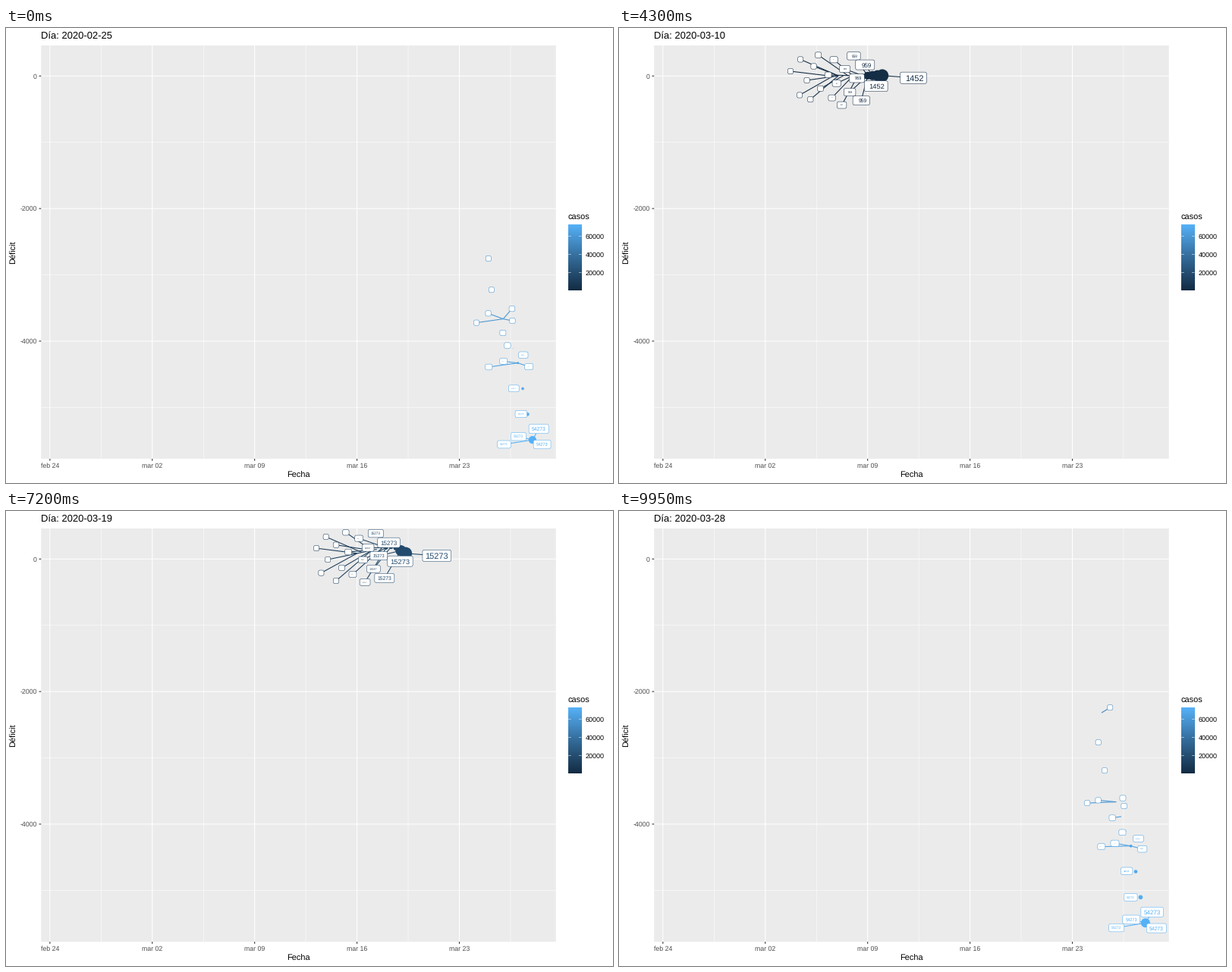
Recreate the animation shown at these times as a matplotlib script. Size 800 by 600 pixels, loop 10000 ms.

```python
import numpy as np
import matplotlib.pyplot as plt
from matplotlib.animation import FuncAnimation
from matplotlib.colors import LinearSegmentedColormap
from matplotlib.patches import Circle, FancyBboxPatch, Rectangle

plt.rcParams.update({"font.family": "Liberation Sans", "path.snap": False,
                     "text.hinting": "no_hinting"})

WIDTH, HEIGHT, FRAMES, INTERVAL = 800, 600, 200, 50
LEFT, RIGHT, TOP, BOTTOM = 46.3, 724.7, 23, 568
PX = 0.72  # points per pixel at 100 dpi
WAKE = 20
FIRST_DAY, FIRST_FRAME, LAST_FRAME = 9, 50, 197
STEEP_DAY = 26.5
PAD = 3.6
GOLDEN = 0.618034

# Active cases per day, 4 to 28 March; the total grows a little faster
ACTIVE = np.array([198, 254, 357, 490, 629, 959, 1452, 1954, 2692, 3900, 5100,
                   6948, 8352, 9659, 12037, 15273, 17393, 21475, 24277, 27552,
                   33183, 38809, 45084, 49844, 54273])
SHARE = ACTIVE * (1.05 + 5.2e-6 * ACTIVE) / 72248
DEFICIT = {9: 0, 18: 10, 20: 40, 22: 130, 23.5: 190, 25: 0, 27: -400,
           28: -765, 29: -1510, 30: -2320, 31: -3665, 32: -4330, 33: -5490}

# Label offsets: the two newest, and the four held steps of a day
NEWEST = [(41, 3), (-3, 14)]
HELD = [(-38, 8), (-19, -7), (14, 8), (9, -17)]

blues = LinearSegmentedColormap.from_list(
    "blues", ["#132B43", "#336B99", "#56B1F7"])


def x_px(day):
    return LEFT + (day + 0.6) * (RIGHT - LEFT) / 35.2


def y_px(value):
    return 63.3 - 0.0874 * value


class Item:
    """One day value or in-between step, as seen at a given age."""

    def __init__(self, frame, age):
        step, self.phase = divmod(frame - FIRST_FRAME, 6)
        t = step + max(0, self.phase - 3) / 3
        self.day = FIRST_DAY + t
        self.age = age
        self.x = x_px(self.day)
        self.y = y_px(np.interp(self.day, list(DEFICIT),
                                list(DEFICIT.values())))
        self.color = blues(np.interp(t, np.arange(len(SHARE)), SHARE))
        self.scale = (1 - age / WAKE) ** 3
        self.text = str(ACTIVE[min(round(t), len(ACTIVE) - 1)])
        self.font = 11 * self.scale
        digits = len(self.text)
        self.w = 2 * PAD + self.font * (0.556 * digits + 0.278 * (5 - digits))
        self.h = 2 * PAD + 0.72 * self.font


def label_start(item, head):
    """Fan out behind a flat curve, stay beside the points of a steep one."""
    if item.age < 2:
        return np.add((item.x, item.y), NEWEST[item.age])
    if head.day < STEEP_DAY:
        rise = -32 + 75 * (item.age * GOLDEN % 1)
        return np.array([head.x - 12 - 5.2 * item.age, head.y + rise])
    if item.phase > 3:
        side = (2, 10) if item.age < 5 else (-item.w / 2 - 4, 0)
    else:
        dx, dy = HELD[item.phase]
        side = dx, dy * (0.5 + 0.5 * item.scale)
    return np.add((item.x, item.y), side)


def separate(pos, size):
    """Push overlapping boxes apart and keep them inside the panel."""
    reach = (size[:, None] + size[None]) / 2
    low = np.array([LEFT, TOP]) + size / 2 + 1
    high = np.array([RIGHT, BOTTOM]) - size / 2 - 1
    for _ in range(60):
        delta = pos[:, None] - pos[None]
        overlap = reach - np.abs(delta)
        hit = (overlap > 0).all(axis=2)
        np.fill_diagonal(hit, False)
        if not hit.any():
            break
        axis = overlap.argmin(axis=2)[..., None] == np.arange(2)
        push = np.where(delta >= 0, 1, -1) * overlap * axis * hit[..., None]
        pos = np.clip(pos + 0.3 * push.sum(axis=1), low, high)
    return np.clip(pos, low, high)


def place_labels(frame, items):
    rng = np.random.default_rng(frame)
    pos = np.array([label_start(item, items[-1]) for item in items])
    spread = np.array([[0.15 * item.age] for item in items])
    pos = pos + spread * rng.normal(size=pos.shape)
    return separate(pos, np.array([(item.w, item.h) for item in items]))


fig = plt.figure(figsize=(WIDTH / 100, HEIGHT / 100), dpi=100,
                 facecolor="white")
ax = fig.add_axes([0, 0, 1, 1])


def label(x, y, text, size, color="black", **kw):
    return ax.text(x, y, text, fontsize=size * PX, color=color, **kw)


def line(xs, ys, color, width, z):
    return ax.plot(xs, ys, color=color, lw=width * PX, zorder=z,
                   solid_capstyle="butt")[0]


def draw_static():
    ax.add_patch(Rectangle((LEFT, TOP), RIGHT - LEFT, BOTTOM - TOP,
                           fc="#EBEBEB", lw=0, zorder=0))
    weeks = ["feb 24", "mar 02", "mar 09", "mar 16", "mar 23"]
    for i, name in enumerate(weeks):
        x = x_px(7 * i)
        line([x, x], [TOP, BOTTOM], "white", 1.07, 1)
        line([x_px(7 * i + 3.5)] * 2, [TOP, BOTTOM], "white", 0.53, 1)
        line([x, x], [BOTTOM, BOTTOM + 2.75], "#333333", 1.07, 1)
        label(x, 580, name, 8.8, "#4D4D4D", ha="center")
    for value in (0, -2000, -4000):
        y = y_px(value)
        line([LEFT, RIGHT], [y, y], "white", 1.07, 1)
        line([LEFT, RIGHT], [y_px(value - 1000)] * 2, "white", 0.53, 1)
        line([LEFT - 2.75, LEFT], [y, y], "#333333", 1.07, 1)
        label(41, y + 3.2, str(value), 8.8, "#4D4D4D", ha="right")
    label(385.5, 593, "Fecha", 11, ha="center")
    label(9.5, 295.5, "Déficit", 11, rotation=90, ha="center", va="center")

    label(741, 253, "casos", 11)
    ramp = np.linspace(1, 0, 256)[:, None]
    ax.imshow(ramp, cmap=blues, extent=(741.2, 758.5, 346.5, 260.1),
              aspect="auto", zorder=1)
    for value in (20000, 40000, 60000):
        y = 346.5 - value * 0.0012
        for x in (741.2, 755):
            line([x, x + 3.5], [y, y], "white", 0.53, 2)
        label(764, y + 3.2, str(value), 9)
    ax.set_xlim(0, WIDTH)
    ax.set_ylim(HEIGHT, 0)
    ax.axis("off")


draw_static()
title = label(46, 14, "", 13)
moving = []


def draw_item(item, cx, cy, z):
    diameter = 16.6 * item.scale
    if diameter > 0.6:
        moving.append(ax.add_patch(Circle((item.x, item.y), diameter / 2,
                                          fc=item.color, lw=0, zorder=3)))
    gap = np.hypot(max(0, abs(cx - item.x) - item.w / 2),
                   max(0, abs(cy - item.y) - item.h / 2))
    if gap > 7.2:
        moving.append(line([item.x, cx], [item.y, cy], item.color, 1.07, 4))
    moving.append(ax.add_patch(FancyBboxPatch(
        (cx - item.w / 2, cy - item.h / 2), item.w, item.h,
        boxstyle="round,pad=0,rounding_size=2.16", fc="white",
        ec=item.color, lw=0.53 * PX, zorder=z)))
    if item.font > 1:
        moving.append(label(cx + item.w / 2 - PAD, cy + 0.36 * item.font,
                            item.text, item.font, item.color,
                            ha="right", zorder=z))


def update(frame):
    while moving:
        moving.pop().remove()
    day = 1 + (frame + 2) // 7 if frame < 26 else 5 + (frame - 26) // 6
    title.set_text(f"Día: {np.datetime64('2020-02-24') + day}")

    # The wake of the last days runs on into the start of the loop
    now = frame + FRAMES if frame < WAKE else frame
    items = [Item(now - age, age) for age in range(WAKE, -1, -1)
             if FIRST_FRAME <= now - age <= LAST_FRAME]
    if items:
        places = place_labels(now, items)
        for i, (item, (cx, cy)) in enumerate(zip(items, places)):
            draw_item(item, cx, cy, 5 + i)
    return moving


anim = FuncAnimation(fig, update, frames=FRAMES, interval=INTERVAL,
                     init_func=lambda: [], repeat=True, repeat_delay=0,
                     blit=False)
plt.show()
```
